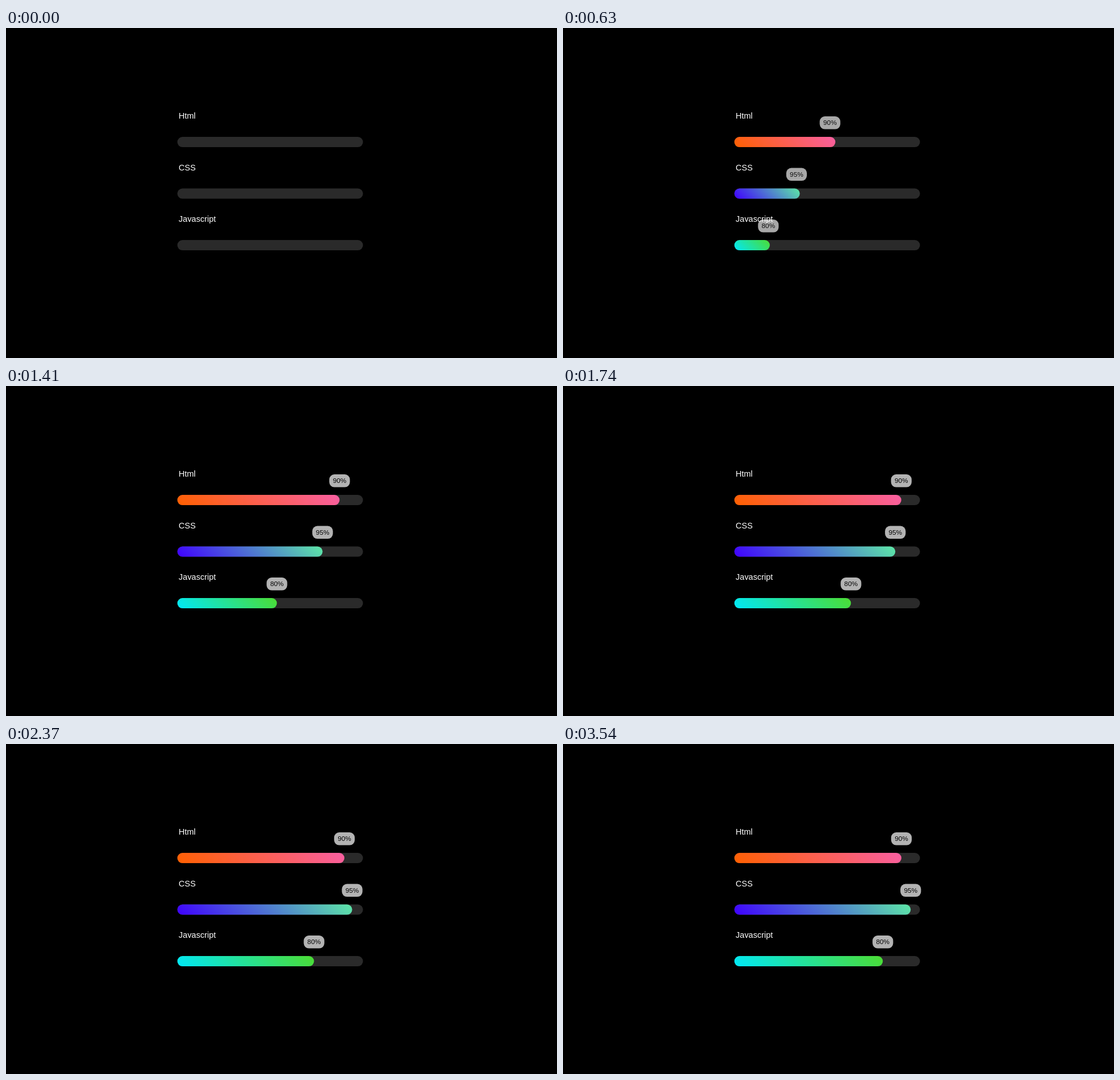
Write an HTML page with a canvas that moves like this. It is 967 by 579 pixels and loops after 4940 ms.

```html
<!DOCTYPE html>
<html lang="en">
<head>
<meta charset="utf-8">
<title>Skill bars</title>
<style>
  html, body { margin: 0; width: 100%; height: 100%; overflow: hidden; background: #000; }
  canvas { display: block; }
</style>
</head>
<body>
<canvas id="stage" width="967" height="579"></canvas>
<script>
const ctx = document.getElementById('stage').getContext('2d');

const LOOP = 4940, STEP = 30, LAST = 3540, TIP_TIME = 900;
const X = 300.7, TRACK = 325.8, BAR_H = 18.1, PITCH = 90.5;
const TIP_W = 36.2, TIP_H = 22.6;
const FONT = '"Liberation Sans", Arial, sans-serif';

const skills = [
  { name: 'Html', percent: 90, time: 1800, from: '#ff6000', to: '#f95fa2' },
  { name: 'CSS', percent: 95, time: 2700, from: '#3f00ff', to: '#5de8a6' },
  { name: 'Javascript', percent: 80, time: 3600, from: '#00e8f8', to: '#4cdc32' }
];

// CSS "ease": cubic-bezier(.25, .1, .25, 1)
function ease(x) {
  if (x <= 0) return 0;
  if (x >= 1) return 1;
  const bezier = (a, b, u) => 3 * a * u * (1 - u) ** 2 + 3 * b * u * u * (1 - u) + u ** 3;
  let lo = 0, hi = 1;
  for (let i = 0; i < 24; i++) {
    const mid = (lo + hi) / 2;
    if (bezier(0.25, 0.25, mid) < x) lo = mid; else hi = mid;
  }
  return bezier(0.1, 1, lo);
}

function pill(x, y, w, h, r, fill) {
  ctx.fillStyle = fill;
  ctx.beginPath();
  ctx.roundRect(x, y, w, h, r);
  ctx.fill();
}

function text(str, x, y, size, color, align) {
  ctx.font = size + 'px ' + FONT;
  ctx.textAlign = align;
  ctx.fillStyle = color;
  ctx.fillText(str, x, y);
}

// 45 degree gradient reaching from corner to corner
function diagonal(x, y, w, h, from, to) {
  const cx = x + w / 2, cy = y + h / 2, d = (w + h) / 4;
  const g = ctx.createLinearGradient(cx - d, cy + d, cx + d, cy - d);
  g.addColorStop(0, from);
  g.addColorStop(1, to);
  return g;
}

function drawSkill(skill, top, t) {
  const barY = top + 191, tipY = top + 155;
  const w = TRACK * skill.percent / 100 * ease(t / skill.time);
  const shown = ease(t / TIP_TIME);

  text(skill.name, 303.1, top + 159.3, 14.48, '#fff', 'left');
  pill(X, barY, TRACK, BAR_H, BAR_H / 2, '#2a2a2a');
  if (w > 0) {
    pill(X, barY, w, BAR_H, BAR_H / 2, diagonal(X, barY, w, BAR_H, skill.from, skill.to));
  }

  // The tip slides from the left edge to the end of the bar while fading in
  const tipX = X + shown * (w - TIP_W / 2);
  ctx.globalAlpha = shown;
  pill(tipX, tipY, TIP_W, TIP_H, 9, 'rgba(255,255,255,0.7)');
  text(skill.percent + '%', tipX + TIP_W / 2, tipY + 15.4, 11.77, '#000', 'center');
  ctx.globalAlpha = 1;
}

function draw(now) {
  const t = Math.min(Math.floor((now % LOOP) / STEP) * STEP, LAST);
  ctx.fillStyle = '#000';
  ctx.fillRect(0, 0, 967, 579);
  skills.forEach((skill, i) => drawSkill(skill, i * PITCH, t));
}

const start = performance.now();
function tick() {
  draw(performance.now() - start);
  requestAnimationFrame(tick);
}
tick();
</script>
</body>
</html>
```
